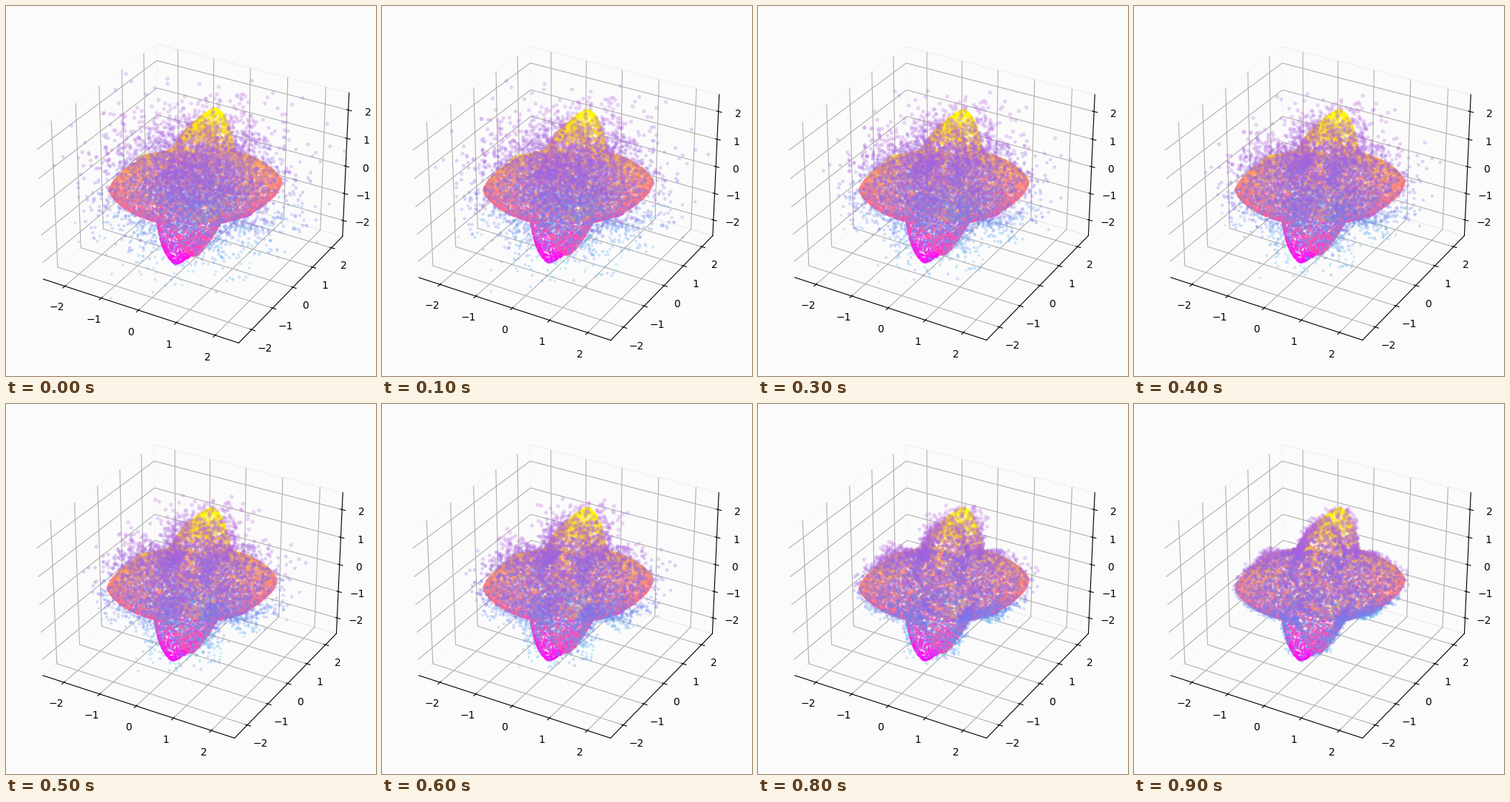
A matplotlib script that plays this animation: 500 by 500 pixels, repeating every 1 s.

```python
import numpy as np
import matplotlib.pyplot as plt
from matplotlib.animation import FuncAnimation
from matplotlib.colors import LinearSegmentedColormap

FRAMES, INTERVAL = 10, 100
LIMIT = 2.6
BACKGROUND = "#fbfbfb"
N_SURFACE, N_CLOUD = 10000, 5500
CLOUD_COLORS = LinearSegmentedColormap.from_list(
    "cloud", ["#40e0f0", "#50b0f4", "#7480f0", "#a060e0", "#b868e0", "#c070e0"])
rng = np.random.default_rng(7)

# Camera basis: right, up, towards the viewer (elev 30, azim -60).
C30 = np.sqrt(3) / 2
VIEW = np.array([[C30, 0.5, 0], [-0.25, C30 / 2, C30], [C30 / 2, -0.75, 0.5]])

# Lobe tips in camera coordinates (right, up, near), with their sharpness.
LOBES = [
    ((0.48, 2.28, 0.45), 3.4),
    ((0.05, 1.78, -1.15), 4.2),
    ((-1.32, 0.88, 0.75), 4.0),
    ((-2.00, -0.12, 0.05), 1.6),
    ((0.27, -0.55, 1.90), 3.6),
]
BASE = 1.03


def unit(v):
    return v / np.linalg.norm(v, axis=-1, keepdims=True)


def radius(directions):
    """Radius of the lobed blob, symmetric through its centre."""
    bumps = []
    for tip, sharpness in LOBES:
        tip = np.array(tip)
        angle = np.arccos(np.clip(np.abs(directions @ unit(tip)), 0, 1))
        height = np.linalg.norm(tip) - BASE
        bumps.append(height * np.exp(-sharpness * angle**1.35))
    return BASE + np.max(bumps, axis=0)


def sample_surface(count):
    directions = unit(rng.normal(size=(count * 10, 3)))
    r = radius(directions)
    keep = rng.random(len(r)) < (r / 2.4) ** 2.6
    points = (directions * r[:, None])[keep][:count]
    return points @ VIEW


def nearest(points, targets):
    found = []
    for chunk in np.array_split(points, 20):
        distance = (targets**2).sum(1) - 2 * chunk @ targets.T
        found.append(targets[distance.argmin(axis=1)])
    return np.concatenate(found)


surface = sample_surface(N_SURFACE)
start = rng.normal(scale=0.93, size=(N_CLOUD, 3))
goal = nearest(start, surface) + rng.normal(scale=0.025, size=start.shape)
level = np.clip((start[:, 2] + 3) / 6, 0, 1)

fig = plt.figure(figsize=(5, 5), dpi=100, facecolor=BACKGROUND)
ax = fig.add_subplot(projection="3d", facecolor=BACKGROUND)
ax.computed_zorder = False
for axis in (ax.xaxis, ax.yaxis, ax.zaxis):
    axis.pane.fill = False


def settle_layout(rounds):
    """Refit the axes to their labels, starting from a full-size box."""
    fig.subplots_adjust(0.03, 0.03, 0.97, 0.97)
    for _ in range(rounds):
        fig.draw_without_rendering()
        fig.tight_layout()


def draw(frame):
    for artist in list(ax.collections):
        artist.remove()
    ax.set(xlim=(-LIMIT, LIMIT), ylim=(-LIMIT, LIMIT), zlim=(-LIMIT, LIMIT))
    settle_layout(frame)
    ax.scatter(*surface.T, c=surface[:, 2], cmap="spring", s=6, alpha=0.6,
               linewidths=0, zorder=1)
    points = start + (goal - start) * frame / FRAMES
    ax.scatter(*points.T, c=level, cmap=CLOUD_COLORS, vmin=0, vmax=1,
               s=5 + 12 * level, alpha=0.28, linewidths=0, zorder=2)
    ax.set(xlim=(-LIMIT, LIMIT), ylim=(-LIMIT, LIMIT), zlim=(-LIMIT, LIMIT))
    return ax.collections


anim = FuncAnimation(fig, draw, frames=FRAMES, interval=INTERVAL,
                     init_func=lambda: (), repeat=True, repeat_delay=0)
plt.show()
```
